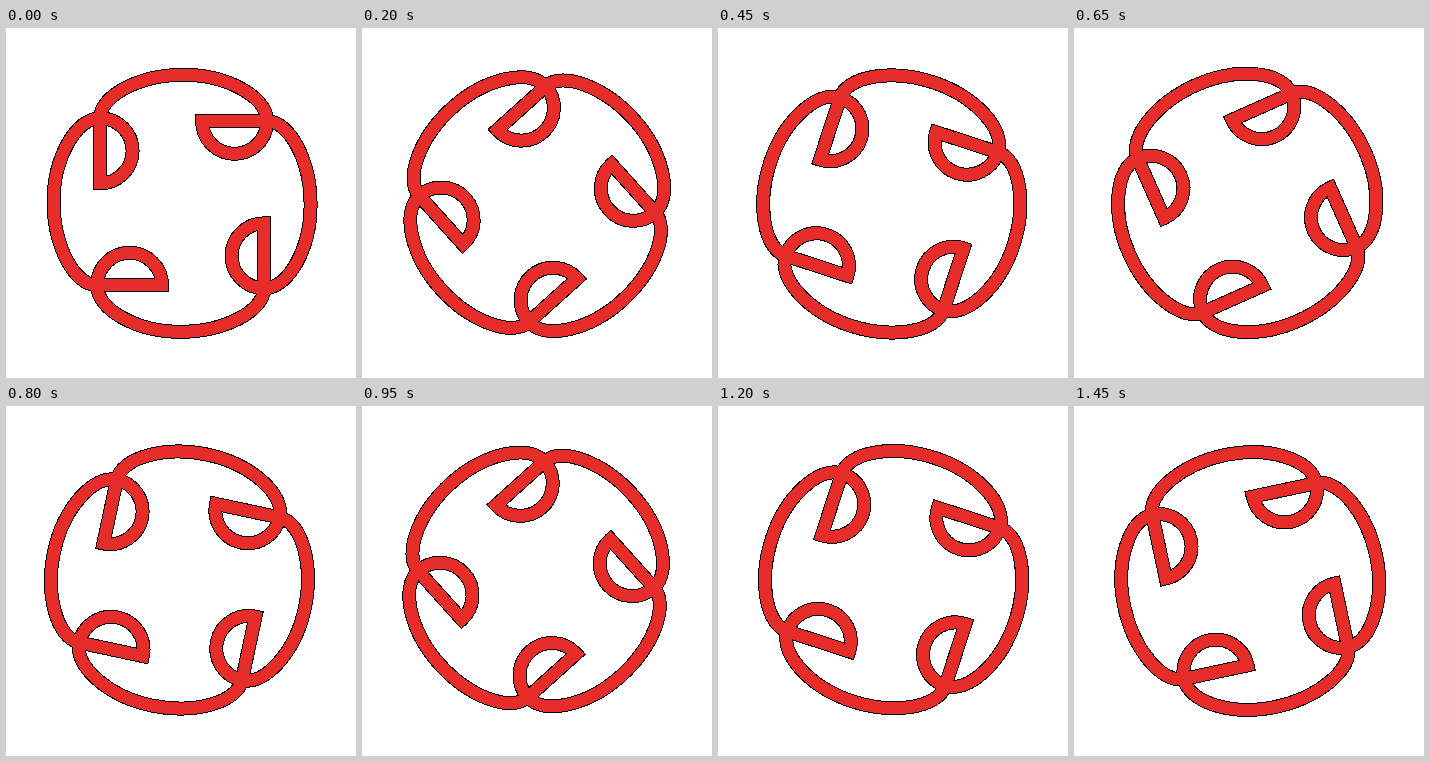
An HTML page for the animation above (1.5 s loop, 350 by 350 pixels).

```html
<!DOCTYPE html>
<html lang="en">
<head>
<meta charset="utf-8">
<title>Turning ring</title>
<style>
  html, body { margin: 0; width: 100%; height: 100%; overflow: hidden; background: #fff; }
  svg { display: block; width: 100vw; height: 100vh; }
  path { fill: none; stroke-linejoin: miter; shape-rendering: crispEdges; }
  .edge { stroke: #000; stroke-width: 14; }
  .band { stroke: #e62d2a; stroke-width: 12; }
</style>
</head>
<body>
<svg viewBox="0 0 350 350"><g id="ring"></g></svg>
<script>
const NS = "http://www.w3.org/2000/svg";
const LOOP = 1500, STEP = 50;
const ring = document.getElementById("ring");

// One long arch, a half circle curling inwards, and its straight side.
const LINK = "M-82 -85 C-82 -107.8 -42.3 -128.5 1.5 -128.5 " +
  "S85 -106.4 85 -82 A32.5 32.5 0 0 1 20 -82 L85 -82";

function addLinks(kind) {
  for (let i = 0; i < 4; i++) {
    const p = document.createElementNS(NS, "path");
    p.setAttribute("d", LINK);
    p.setAttribute("class", kind);
    p.setAttribute("transform", `rotate(${i * 90})`);
    ring.appendChild(p);
  }
}

// All edges lie below all bands, so crossings merge into one outline.
addLinks("edge");
addLinks("band");

function draw(time) {
  const step = Math.floor((time % LOOP) / STEP);
  const angle = step * 360 * STEP / LOOP;
  // The ring sits slightly off its pivot.
  ring.setAttribute("transform", `translate(174.7 174.8) rotate(${angle}) translate(1.4 0.5)`);
}

const start = performance.now();
function tick() {
  draw(performance.now() - start);
  requestAnimationFrame(tick);
}
tick();
</script>
</body>
</html>
```
